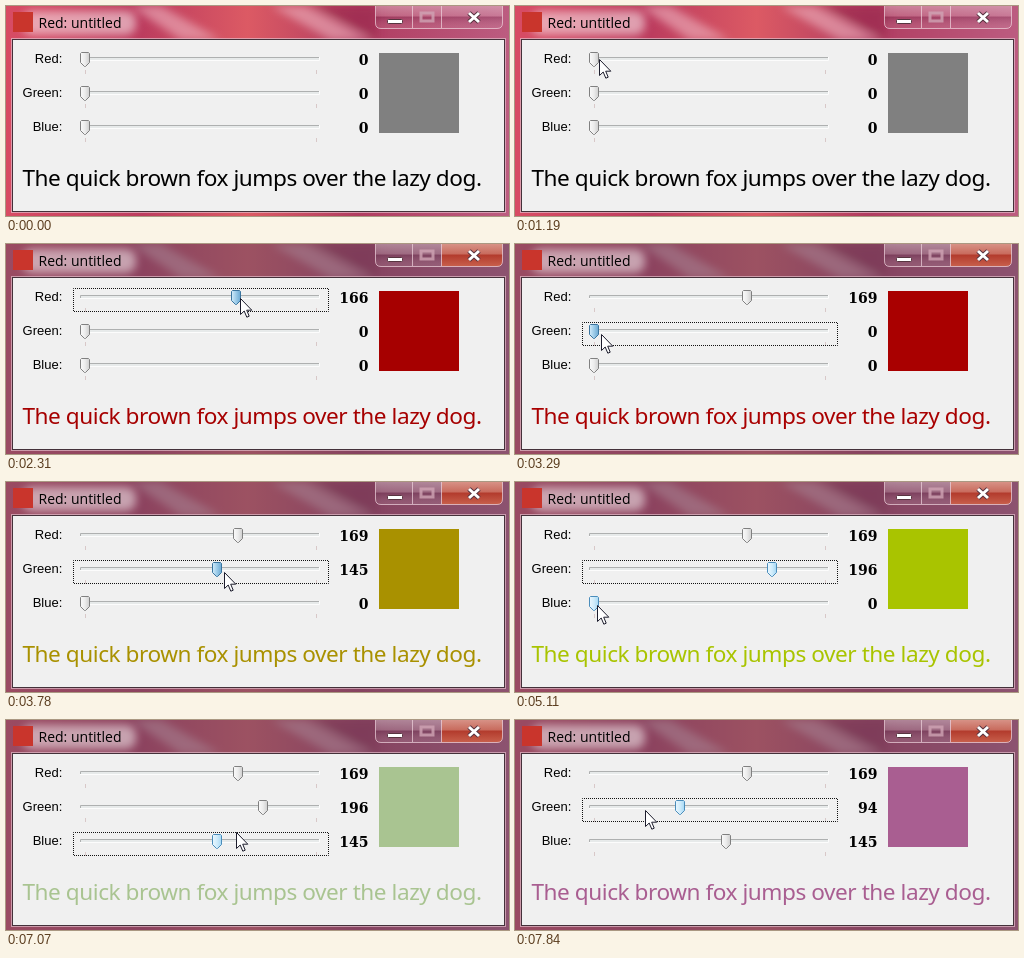
An HTML page that plays this animation: 503x210 px, repeating every 8 s.

```html
<!DOCTYPE html>
<html lang="en">
<head>
<meta charset="utf-8">
<title>Colour sliders</title>
<style>
  html, body { margin: 0; width: 100%; height: 100%; overflow: hidden; background: #8a4660; }
  svg { display: block; width: 503px; height: 210px; }
  text { white-space: pre; }
  .title { font: 14px "Open Sans", "Noto Sans", sans-serif; }
  .label { font: 13px "Liberation Sans", Arial, sans-serif; text-anchor: end; }
  .value { font: bold 14px "DejaVu Serif", "DejaVu Sans", serif; text-anchor: end; }
  .phrase { font: 22.6px "Noto Sans", "Open Sans", sans-serif; letter-spacing: -.02em; }
  .focus { fill: none; stroke: #111; stroke-dasharray: 1 1; stroke-dashoffset: .5; }
</style>
</head>
<body>
<svg viewBox="0 0 503 210" xmlns="http://www.w3.org/2000/svg">
  <defs>
    <linearGradient id="rose">
      <stop offset="0" stop-color="#d84c64"/><stop offset=".27" stop-color="#bc3c5e"/>
      <stop offset=".48" stop-color="#dc5a64"/><stop offset=".7" stop-color="#b03c60"/>
      <stop offset="1" stop-color="#bc5c80"/>
    </linearGradient>
    <linearGradient id="buttons" x2="0" y2="1">
      <stop offset="0" stop-color="#fff" stop-opacity=".35"/><stop offset=".48" stop-color="#fff" stop-opacity=".18"/>
      <stop offset=".5" stop-color="#502040" stop-opacity=".2"/><stop offset="1" stop-color="#fff" stop-opacity=".1"/>
    </linearGradient>
    <linearGradient id="red" x2="0" y2="1">
      <stop offset="0" stop-color="#d9958a"/><stop offset=".48" stop-color="#c86a5c"/>
      <stop offset=".5" stop-color="#b23a2c"/><stop offset="1" stop-color="#c8604c"/>
    </linearGradient>
    <linearGradient id="idle">
      <stop offset="0" stop-color="#fafafa"/><stop offset=".5" stop-color="#ececec"/><stop offset="1" stop-color="#cfcfcf"/>
    </linearGradient>
    <linearGradient id="hot">
      <stop offset="0" stop-color="#eaf7fe"/><stop offset=".5" stop-color="#d0ecfb"/><stop offset="1" stop-color="#a6d8f4"/>
    </linearGradient>
    <linearGradient id="down">
      <stop offset="0" stop-color="#d4ecfa"/><stop offset=".5" stop-color="#9ccbe8"/><stop offset="1" stop-color="#6aa8d2"/>
    </linearGradient>
    <filter id="soft" x="-30%" y="-80%" width="160%" height="260%"><feGaussianBlur stdDeviation="4"/></filter>
  </defs>

  <rect width="503" height="210" fill="url(#rose)"/>
  <g filter="url(#soft)" opacity=".6">
    <path d="M125 0 H155 L215 34 H175Z M265 0 H300 L365 34 H325Z" fill="#eeb4c0"/>
    <path d="M305 0 H372 V34Z" fill="#98284c"/>
  </g>
  <rect id="shade" width="503" height="210" fill="#5e4a60" opacity=".5"/>

  <rect x="16" y="5" width="114" height="24" rx="10" fill="#fff" opacity=".5" filter="url(#soft)"/>
  <rect x="7" y="6" width="20" height="20" fill="#c9352c"/>
  <text class="title" x="32.5" y="22">Red: untitled</text>

  <path d="M369.5 -1 V17 Q369.5 22.5 375 22.5 H491 Q496.5 22.5 496.5 17 V-1Z" fill="url(#buttons)"/>
  <path id="close" d="M435.5 -1 V22.5 H491 Q496.5 22.5 496.5 17 V-1Z" fill="url(#red)"/>
  <path d="M369.5 -1 V17 Q369.5 22.5 375 22.5 H491 Q496.5 22.5 496.5 17 V-1 M406.5 0 V22 M435.5 0 V22"
        fill="none" stroke="#f0d5de" stroke-opacity=".7"/>
  <rect x="381.5" y="13.5" width="15" height="4" rx="1" fill="#fff" stroke="#583440"/>
  <path d="M415 7 H427 V15 H415Z" fill="none" stroke="#d0a4b4" stroke-width="3" opacity=".8"/>
  <g fill="none">
    <path d="M463 7 L473 16 M473 7 L463 16" stroke="#583440" stroke-width="5"/>
    <path d="M463 7 L473 16 M473 7 L463 16" stroke="#fff" stroke-width="3"/>
  </g>

  <rect x="5.5" y="32.5" width="494" height="174" fill="none" stroke="#e3bdc9" stroke-opacity=".7"/>
  <rect x="6.5" y="33.5" width="492" height="172" fill="#f0f0f0" stroke="#44313a"/>

  <g id="rows"></g>
  <rect id="swatch" x="373" y="47" width="80" height="80"/>
  <text class="phrase" id="phrase" x="16.5" y="180">The quick brown fox jumps over the lazy dog.</text>
  <path id="cursor" d="M.5 .5 V16.5 L4.2 13 L6.8 19.2 L9.2 18.2 L6.7 12.2 H11.8Z" fill="#fff" stroke="#1c1c2c"/>
</svg>

<script>
const LOOP = 8000, TICK = 70, ENTER = 350;
const $ = id => document.getElementById(id);

const sliders = [
  { name: "Red", grab: [4, 1] },
  { name: "Green", grab: [7, 3] },
  { name: "Blue", grab: [2.5, 2] }
];
sliders.forEach((s, i) => s.y = 53 + 34 * i);

// A step with a level drags that row's thumb; any other moves the pointer to a row or point.
const steps = [
  { from: 280, to: 770, point: [87, 50] },
  { from: 1050, to: 1260, row: 0 },
  { from: 1400, to: 2415, row: 0, level: 169 },
  { from: 2520, to: 3150, row: 1 },
  { from: 3290, to: 4187, row: 1, level: 196 },
  { from: 4410, to: 5110, row: 2 },
  { from: 5180, to: 5950, row: 2, level: 227 },
  { from: 6090, to: 6720, row: 2, level: 145 },
  { from: 7000, to: 7210, row: 1 },
  { from: 7280, to: 7770, row: 1, level: 94 },
  { from: 7770, to: 7840, point: [130, 90] }
];

const edge = { idle: "#808080", hot: "#4b8dbb", down: "#3a749e" };
const mix = (a, b, p) => a + (b - a) * p;
const part = (t, from, to) => Math.min(1, Math.max(0, (t - from) / (to - from)));
const easeOut = p => 1 - (1 - p) ** 1.9;
const thumbX = level => Math.round(79.4 + level * .9055);
const show = (el, on) => el.style.display = on ? "" : "none";
const place = (el, x, y) => el.setAttribute("transform", `translate(${Math.round(x)} ${Math.round(y)})`);

function sceneAt(t) {
  const levels = [0, 0, 0], looks = ["idle", "idle", "idle"];
  let pointer = [366, 195], focus = -1;
  const grabPoint = row => {
    const { grab, y } = sliders[row];
    return [thumbX(levels[row]) + grab[0], y + grab[1]];
  };
  for (const { from, to, row, level, point } of steps) {
    if (t < from) break;
    looks.fill("idle");
    if (level !== undefined) {
      // the press itself takes one tick
      const p = easeOut(part(t, from + TICK, to));
      levels[row] = Math.round(mix(levels[row], level, p));
      looks[row] = "down";
      focus = row;
      pointer = grabPoint(row);
    } else {
      const p = part(t, from, to);
      const goal = point || grabPoint(row);
      pointer = pointer.map((v, i) => mix(v, goal[i], p));
      if (focus >= 0) looks[focus] = "hot";
      if (row >= 0 && p > .9) looks[row] = "hot";
    }
  }
  return { levels, looks, pointer, focus };
}

function add(parent, tag, attrs, text = "") {
  const el = document.createElementNS("http://www.w3.org/2000/svg", tag);
  for (const k in attrs) el.setAttribute(k, attrs[k]);
  el.textContent = text;
  return parent.appendChild(el);
}

for (const s of sliders) {
  const g = add($("rows"), "g", { transform: `translate(0 ${s.y})` });
  add(g, "text", { class: "label", x: 56.3, y: 4 }, s.name + ":");
  add(g, "rect", { x: 74, y: -2, width: 240, height: 4, fill: "#e7eaea" });
  add(g, "path", { d: "M74.5 2 V-1.5 H314", fill: "none", stroke: "#aeb0b0" });
  add(g, "path", { d: "M74 1.5 H313.5 V-2", fill: "none", stroke: "#fcfcfc" });
  add(g, "path", { d: "M79.5 11 V15 M310.5 11 V15", stroke: "#d8c8c8" });
  s.ring = add(g, "rect", { class: "focus", x: 67.5, y: -8.5, width: 255, height: 23 });
  s.thumb = add(g, "path", { d: "M-3.5 -6.5 H3.5 L4.5 -5.5 V3.5 L.5 7.5 H-.5 L-4.5 3.5 V-5.5Z" });
  s.text = add(g, "text", { class: "value", x: 362.5, y: 6 });
}

function draw(t) {
  const { levels, looks, pointer, focus } = sceneAt(t);
  sliders.forEach((s, i) => {
    place(s.thumb, thumbX(levels[i]), 0);
    s.thumb.setAttribute("fill", `url(#${looks[i]})`);
    s.thumb.setAttribute("stroke", edge[looks[i]]);
    show(s.ring, focus === i);
    s.text.textContent = levels[i];
  });
  const color = `rgb(${levels})`;
  $("swatch").setAttribute("fill", levels.some(Boolean) ? color : "#808080");
  $("phrase").setAttribute("fill", color);
  show($("shade"), focus >= 0);
  show($("close"), focus >= 0);
  show($("cursor"), t >= ENTER);
  place($("cursor"), ...pointer);
}

function frame() {
  const t = performance.now() % LOOP;
  draw(Math.floor(t / TICK) * TICK);
  requestAnimationFrame(frame);
}
frame();
</script>
</body>
</html>
```
